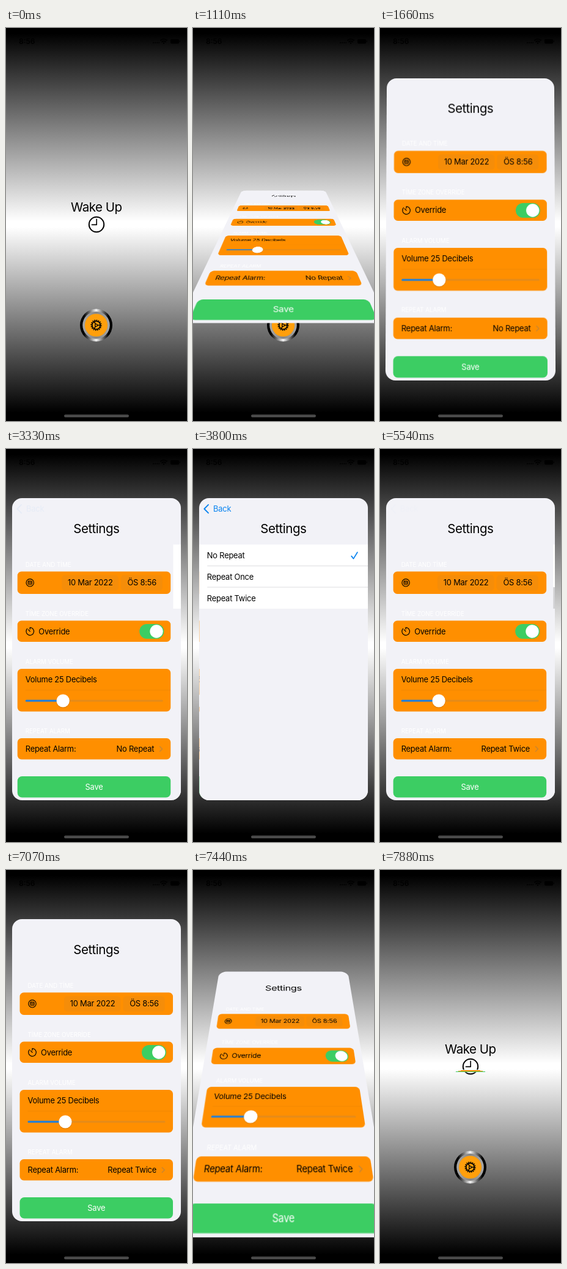
These frames come from a looping animation (296x640 px, 8 s). An HTML page:

```html
<!DOCTYPE html>
<html lang="en">
<head>
<meta charset="utf-8">
<title>Alarm settings</title>
<style>
  html, body { margin: 0; width: 100%; height: 100%; overflow: hidden; background: #000; }
  #stage {
    position: relative; width: 296px; height: 640px; overflow: hidden;
    background: linear-gradient(#000 9px, #fff 315px, #fff 324px, #000 626px);
  }
  svg { display: block; font: 12.9px Inter, "Noto Sans", sans-serif; letter-spacing: -.22px; }
  #home { position: absolute; inset: 0; }
  #card {
    position: absolute; left: 10px; top: 80px; width: 276px; height: 492px;
    border-radius: 16px; overflow: hidden; background: #f2f2f7; visibility: hidden;
  }
  .title { font-size: 20.5px; letter-spacing: -.5px; text-anchor: middle; }
  .head { font-size: 9.8px; letter-spacing: -.03px; fill: #fff; }
  .mid { text-anchor: middle; }
  .end { text-anchor: end; }
  .row { fill: #ff8f00; }
  .green { fill: #3ccd63; }
  .blue { fill: #0a84f0; }
  .line { fill: none; stroke: #000; stroke-linecap: round; stroke-linejoin: round; }
  .line.blue { fill: none; stroke: #0a84f0; }
</style>
</head>
<body>
<div id="stage">
  <svg id="home" width="296" height="640" viewBox="0 0 296 640">
    <defs>
      <linearGradient id="metal">
        <stop offset="0"/>
        <stop offset=".12"/>
        <stop offset=".5" stop-color="#f4f4f4"/>
        <stop offset=".88"/>
        <stop offset="1"/>
      </linearGradient>
      <linearGradient id="rim">
        <stop offset="0" stop-color="#a8a8a8"/>
        <stop offset=".5" stop-color="#858585"/>
        <stop offset="1" stop-color="#a8a8a8"/>
      </linearGradient>
    </defs>

    <!-- status bar -->
    <text x="21" y="26" font-size="12" font-weight="600" letter-spacing="0">8:56</text>
    <g class="line" stroke-width="1.8" stroke-linecap="butt">
      <path d="M253 20a7.4 7.4 0 0 1 10 0M255 22.6a4.4 4.4 0 0 1 6 0"/>
    </g>
    <circle cx="258" cy="24.6" r="1.2"/>
    <rect x="269" y="18" width="14" height="7.5" rx="2"/>
    <rect x="283.6" y="20.2" width="1.2" height="3" rx=".6"/>
    <path d="M240 24h11" stroke="#000" stroke-width="1.6" stroke-dasharray="2 1.2"/>
    <rect x="95" y="629.5" width="106" height="4.4" rx="2.2" fill="#4a4a4a"/>

    <text class="title" x="147.8" y="299.3">Wake Up</text>
    <g class="line" stroke-width="2">
      <circle cx="148" cy="320" r="12.2"/>
      <path d="M140.5 320.4h7.7v-9" stroke-width="1.6"/>
    </g>

    <!-- settings button -->
    <g transform="translate(147.5 484)">
      <circle r="26.5" fill="url(#metal)"/>
      <circle r="22.3" fill="url(#rim)"/>
      <circle r="18.6" fill="#ff9f0c"/>
      <g id="gear" fill="none" stroke="#000">
        <circle r="6.7" stroke-width="1.7"/>
        <circle r="8.2" stroke-width="1.7" pathLength="32" stroke-dasharray="1.1 .9"/>
        <circle r="1.9" stroke-width="1.2"/>
        <path d="M2 0H6.5M-1 -1.73L-3.25 -5.63M-1 1.73L-3.25 5.63" stroke-width="1.5"/>
      </g>
    </g>
  </svg>

  <div id="card">
    <svg width="276" height="492" viewBox="10 80 276 492">
      <!-- settings form -->
      <g id="form">
        <g class="head">
          <text x="35.5" y="191.5">DATE AND TİME</text>
          <text x="35.5" y="271.5">TİME ZONE OVERRİDE</text>
          <text x="35.5" y="350">ALARM VOLUME</text>
          <text x="35.5" y="462.5">REPEAT ALARM</text>
        </g>
        <g class="row">
          <rect x="22.5" y="199.5" width="250.5" height="36.5" rx="6.5"/>
          <rect x="22.5" y="279.5" width="250.5" height="34.5" rx="6.5"/>
          <rect x="22.5" y="358" width="250.5" height="69.5" rx="6.5"/>
          <rect x="22.5" y="471" width="250.5" height="34.5" rx="6.5"/>
        </g>

        <g fill="#767680" fill-opacity=".07">
          <rect x="95" y="205.5" width="92.5" height="25" rx="5"/>
          <rect x="191.5" y="205.5" width="68" height="25" rx="5"/>
        </g>
        <g class="line" stroke-width="1.2">
          <circle cx="43" cy="217.8" r="6.2"/>
          <rect x="39.8" y="214.8" width="6.4" height="6" rx="1" stroke-width=".9"/>
          <path d="M40 216.6h6M40.6 218.8h5" stroke-width="1"/>
        </g>
        <text class="mid" x="141.5" y="222.4">10 Mar 2022</text>
        <text class="mid" x="226" y="222.4">ÖS 8:56</text>

        <g class="line" stroke-width="1.2">
          <path d="M43 293.4v-2.7a6.3 6.3 0 1 1 -4.6 2M43 297l-2.8 -2.8"/>
        </g>
        <text x="57" y="301.5">Override</text>
        <rect class="green" x="222" y="285" width="40" height="24" rx="12"/>
        <circle cx="249.8" cy="297" r="10.7" fill="#fff"/>

        <text x="35.5" y="380">Volume 25 Decibels</text>
        <path d="M35.5 392.7H273" stroke="#3c3c43" stroke-opacity=".12" stroke-width=".6"/>
        <rect x="35.5" y="408.6" width="225" height="3" rx="1.5" fill="#787880" fill-opacity=".2"/>
        <rect x="35.5" y="408.6" width="62" height="3" rx="1.5" fill="#1a7fe0"/>
        <circle cx="97" cy="411" r="11" fill="#000" fill-opacity=".1"/>
        <circle cx="97" cy="410" r="10.6" fill="#fff"/>

        <text x="35.5" y="493">Repeat Alarm:</text>
        <text class="end" id="value" x="246" y="493">No Repeat</text>
        <path class="line" d="M255.3 484.6l4 4l-4 4" style="stroke:#c98530" stroke-width="1.4"/>

        <rect class="green" x="22.5" y="533" width="250.5" height="34.5" rx="7.5"/>
        <text class="mid" x="147.8" y="555" fill="#fff">Save</text>
      </g>

      <!-- repeat picker -->
      <g id="picker">
        <rect x="10" y="155.5" width="276" height="420" fill="#f2f2f7"/>
        <rect x="10" y="155.5" width="276" height="104.5" fill="#fff"/>
        <rect id="press" x="10" y="225" width="276" height="35" fill="#d2d2d5"/>
        <path d="M23 190.3H286M23 225H286" stroke="#d4d4d8" stroke-width=".8"/>
        <text x="22.5" y="178.3">No Repeat</text>
        <text x="22.5" y="213">Repeat Once</text>
        <text x="22.5" y="247.7">Repeat Twice</text>
        <path id="tick" class="line blue" d="M258.8 174.4l3.3 4.2l6.4 -10.4" stroke-width="1.7"/>
      </g>

      <text class="title" x="147.8" y="137.3">Settings</text>
      <g id="back">
        <path class="line blue" d="M25 90.8l-6.6 6.7l6.6 6.7" stroke-width="1.9"/>
        <text class="blue" x="33" y="102">Back</text>
      </g>
    </svg>
  </div>
</div>

<script>
const LOOP = 8000, WIDTH = 276;
// The picture moves in held steps: [first, interval, count]
const RUNS = [
  [0, 0, 1], [500, 0, 1], [770, 113, 8], [1660, 0, 1], [3330, 114, 6], [5070, 100, 2],
  [5320, 107, 4], [7070, 0, 1], [7200, 114, 6], [7880, 0, 1]
];
const TICKS = RUNS.flatMap(([first, gap, n]) => Array.from({ length: n }, (_, i) => first + gap * i));

const [card, form, picker, back, press, tick, value, gear] =
  ['card', 'form', 'picker', 'back', 'press', 'tick', 'value', 'gear'].map(id => document.getElementById(id));

const span = (t, start, length) => Math.min(1, Math.max(0, (t - start) / length));
const smooth = x => x * x * (3 - 2 * x);
const easeOut = x => 1 - (1 - x) ** 3;
const shift = (el, x) => el.setAttribute('transform', `translate(${x.toFixed(2)} 0)`);

function flip(t) {
  const closing = t < 7200 ? 0 : smooth(span(t, 7060, 930));
  const p = smooth(span(t, 720, 1000)) - closing;
  const open = t >= 3330 && t < 7200 ? 1 : p;
  card.style.visibility = t >= 770 && open > 0 ? 'visible' : 'hidden';
  card.style.transform = open === 1 ? 'none'
    : `scale(${easeOut(open)}) perspective(492px) rotateX(${90 * (1 - open)}deg)`;
}

function navigate(t) {
  const p = easeOut(span(t, 3322, 520)) - easeOut(span(t, 5150, 490));
  shift(form, -0.3 * WIDTH * p);
  shift(picker, WIDTH * (1 - p));
  picker.style.visibility = p > 0 ? 'inherit' : 'hidden';
  back.style.opacity = p;
}

function draw(t) {
  flip(t);
  navigate(t);
  press.style.opacity = t >= 5070 ? 1 : 0;
  tick.setAttribute('transform', `translate(0 ${t >= 5170 ? 69.4 : 0})`);
  value.textContent = t >= 5170 ? 'Repeat Twice' : 'No Repeat';
  gear.style.opacity = t >= 500 && t < 770 ? 0.7 : 1;
}

const start = performance.now();
function frame() {
  const t = (performance.now() - start) % LOOP;
  draw(TICKS.findLast(tick => tick <= t));
  requestAnimationFrame(frame);
}
frame();
</script>
</body>
</html>
```
